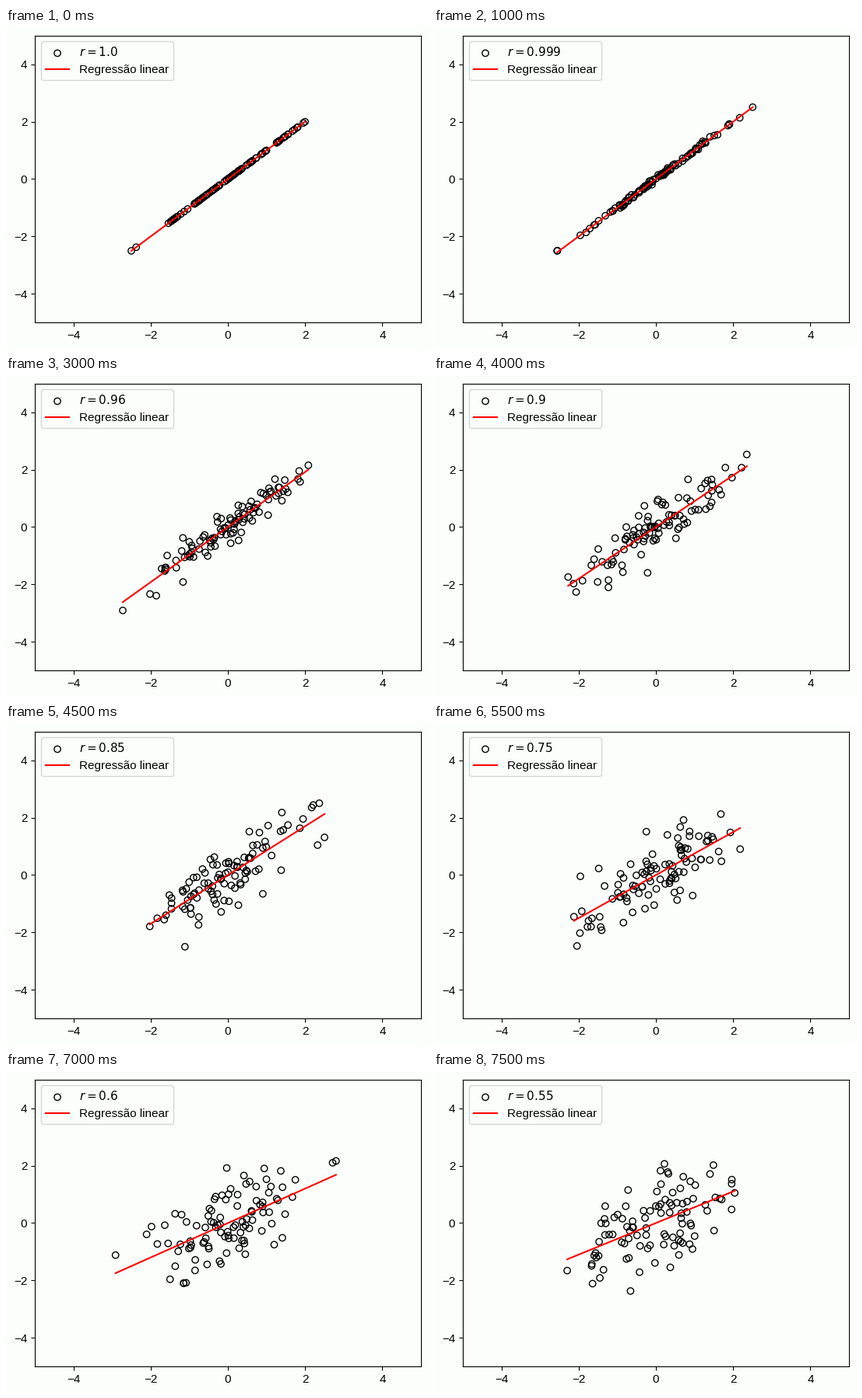
Write a matplotlib script that moves like this. It is 542 px wide and 412 px high and loops after 8 s.

```python
import numpy as np
import matplotlib.pyplot as plt
from matplotlib.animation import FuncAnimation

W, H, DPI = 542, 412, 100
N = 100
BG = "#fbfefb"

plt.rcParams.update({"font.family": "Liberation Sans", "font.size": 11,
                     "figure.facecolor": BG, "axes.facecolor": BG})

# Correlations: nearly perfect first, then steps of 0.01, then of 0.05
RS = [1.0, 0.9999, 0.999]
RS += [n / 100 for n in (*range(99, 95, -1), *range(95, 50, -5))]


def cloud(i):
    """Sample N points of correlation RS[i] whose fitted line is y = r x."""
    r = RS[i]
    rng = np.random.default_rng(i)
    x, noise = rng.standard_normal((2, N))
    x -= x.mean()
    x /= x.std()
    noise -= np.polyval(np.polyfit(x, noise, 1), x)
    return x, r * x + np.sqrt(1 - r**2) * noise


fig = plt.figure(figsize=(W / DPI, H / DPI), dpi=DPI)
left, top, width, height = 37, 9.66, 496, 369.6
ax = fig.add_axes([left / W, 1 - (top + height) / H, width / W, height / H])
ax.set(xlim=(-5, 5), ylim=(-5, 5),
       xticks=range(-4, 5, 2), yticks=range(-4, 5, 2))

dots = ax.scatter(np.zeros(N), np.zeros(N), facecolors="none",
                  edgecolors="black", label="$r = 1.0$")
line, = ax.plot([], [], color="red", label="Regressão linear")
legend = ax.legend(loc="upper left")


def update(i):
    x, y = cloud(i)
    ends = np.array([x.min(), x.max()])
    dots.set_offsets(np.column_stack([x, y]))
    line.set_data(ends, RS[i] * ends)
    legend.get_texts()[0].set_text(f"$r = {RS[i]}$")
    return dots, line, legend


anim = FuncAnimation(fig, update, frames=len(RS), interval=500,
                     repeat=True, repeat_delay=0)
plt.show()
```
